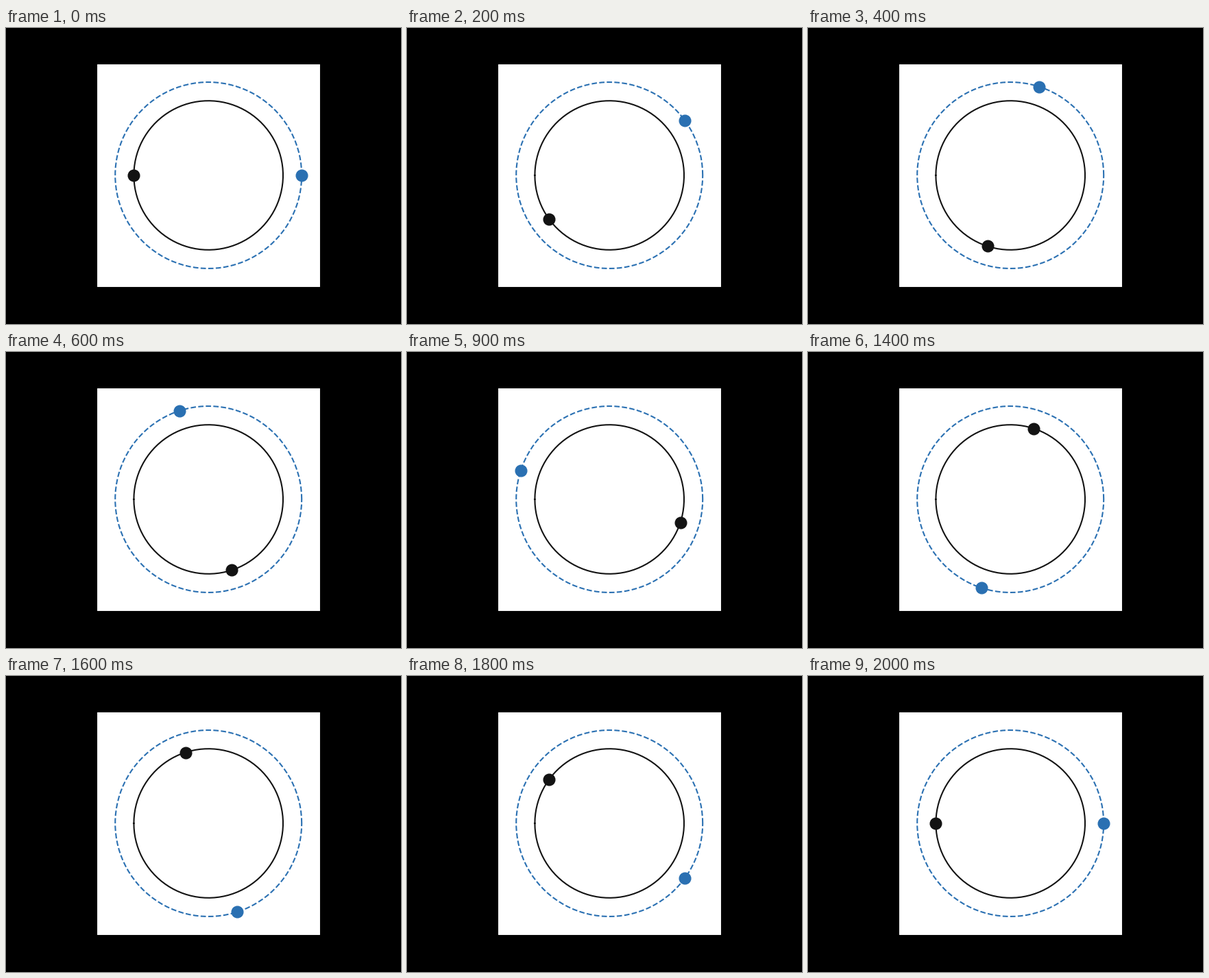
A matplotlib script for the animation above (2.1 s loop, 576 px wide and 432 px high).

```python
import numpy as np
import matplotlib.pyplot as plt
from matplotlib.animation import FuncAnimation

W, H, DPI = 576, 432, 100
FRAMES, INTERVAL = 21, 100
SIDE = 326.4
CENTER = (295.2, 217.0)
DARK, BLUE = "#131313", "#2a70b2"

fig = plt.figure(figsize=(W / DPI, H / DPI), dpi=DPI, facecolor="black")
ax = fig.add_axes([(CENTER[0] - SIDE / 2) / W, (CENTER[1] - SIDE / 2) / H,
                   SIDE / W, SIDE / H], facecolor="white")
ax.set(xlim=(-1.5, 1.5), ylim=(-1.5, 1.5), xticks=[], yticks=[])


def orbit_point(radius, phase, angle):
    return radius * np.cos(angle + phase), radius * np.sin(angle + phase)


def add_orbit(radius, phase, color, style):
    """Draw an orbit and return its moving body with its geometry."""
    path = orbit_point(radius, phase, np.linspace(0, 2 * np.pi, 100))
    ax.plot(*path, style, color=color, lw=1.5)
    body, = ax.plot([], [], "o", color=color, ms=12, zorder=3)
    return body, radius, phase


orbits = [
    add_orbit(1.0, np.pi, DARK, "-"),
    add_orbit(1.25, 0.0, BLUE, "--"),
]


def update(i):
    angle = 2 * np.pi * i / (FRAMES - 1)
    for body, radius, phase in orbits:
        x, y = orbit_point(radius, phase, angle)
        body.set_data([x], [y])
    return [body for body, _, _ in orbits]


anim = FuncAnimation(fig, update, frames=FRAMES, interval=INTERVAL,
                     repeat=True, repeat_delay=0)
plt.show()
```
